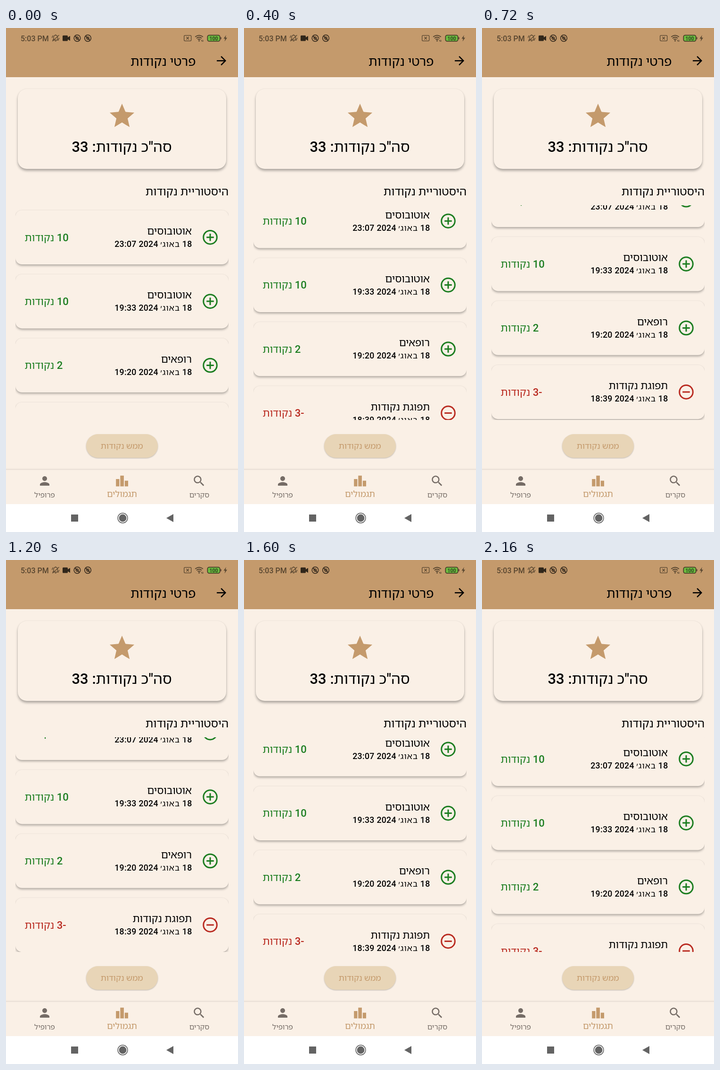
An HTML page that plays this animation: 492 by 1066 pixels, repeating every 2240 ms.

```html
<!DOCTYPE html>
<html lang="he">
<head>
<meta charset="utf-8">
<title>פרטי נקודות</title>
<style>
  html, body { margin: 0; width: 100%; height: 100%; overflow: hidden; background: #faf0e6; }
  svg { display: block; width: 492px; height: 1066px; }
  text { font-family: Roboto, "Noto Sans Hebrew", "Open Sans", "Noto Sans", "Liberation Sans", sans-serif; }
  .rtl { direction: rtl; }
  .mid { text-anchor: middle; }
  .left { text-anchor: end; }
  .strong { font-weight: 500; }
  .card { fill: #faf0e6; filter: drop-shadow(0 0 1px rgba(0,0,0,.09)) drop-shadow(0 3px 2px rgba(0,0,0,.27)); }
  .card.high { filter: drop-shadow(0 0 1.2px rgba(0,0,0,.1)) drop-shadow(0 4px 2.8px rgba(0,0,0,.29)); }
  .line { fill: none; stroke: currentColor; }
  .gain { color: #1b7d20; }
  .loss { color: #b92a20; }
  .pts { fill: currentColor; }
</style>
</head>
<body>
<svg viewBox="0 0 492 1066">
  <defs>
    <clipPath id="view"><rect x="20" y="375" width="452" height="454"/></clipPath>
  </defs>
  <rect width="492" height="1066" fill="#faf0e6"/>
  <rect width="492" height="104" fill="#c49a6c"/>

  <!-- status bar -->
  <g color="#57452f" fill="#57452f">
    <text x="31" y="27.5" font-size="16" font-weight="500">5:03 PM</text>
    <path class="line" stroke-width="1.4" d="M99.5 25.5h11.5l-1.6-2.4v-3.6a4.2 4.2 0 0 0-8.4 0v3.6zM105.2 15.2v-1.4M103.6 27.6h3.2M112.5 15l-14 13M97.8 21q0-3 2-5M112.6 21q0 2-1 3"/>
    <path fill="#30261a" d="M121.5 15.8h8q1.5 0 1.5 1.5v2.4l5-3v10.2l-5-3v2.1q0 1.5-1.5 1.5h-8q-1.5 0-1.5-1.5v-8.7q0-1.5 1.5-1.5z"/>
    <g id="rings" color="#3f3122"></g>
    <rect class="line" x="377.7" y="15.7" width="15" height="11.6" rx="2" stroke-width="1.3"/>
    <path class="line" stroke-width="1.3" d="M382.5 18.8l5.4 5.4m0-5.4l-5.4 5.4"/>
    <path class="line" stroke-width="1.9" d="M401.2 18.7q8.3-6.6 16.6 0M403.9 21.7q5.6-4.4 11.2 0M406.5 24.6q3-2.3 6 0"/>
    <circle cx="409.5" cy="27" r="1.5"/>
    <path class="line" stroke-width="1" d="M415.3 29v-4m-1.5 1.5l1.5-1.5m2.5 0v4m-1.3-1.4l1.3 1.4"/>
    <rect x="427.3" y="15.3" width="26.4" height="12.8" rx="3.5" fill="#6bb83f" stroke="#3f3322" stroke-width="1.5"/>
    <rect x="454.6" y="19.3" width="2" height="4.8" rx="1"/>
    <text class="mid" x="440.5" y="25.5" font-size="10.5" font-weight="500" fill="#26351a">100</text>
    <path d="M466.8 15l-5.3 7.6h3.3l-1.3 5.9 5.5-7.9h-3.4z"/>
  </g>

  <!-- app bar -->
  <text class="rtl" x="402.5" y="80" font-size="27.1">פרטי נקודות</text>
  <path transform="translate(442 54.3) scale(1.253)" d="M12 4l-1.41 1.41L16.17 11H4v2h12.17l-5.58 5.59L12 20l8-8z"/>

  <!-- total -->
  <rect class="card high" x="25" y="129" width="442" height="169" rx="19"/>
  <path fill="#c49a6c" transform="translate(214.7 154.8) scale(2.61)" d="M12 17.27L18.18 21l-1.64-7.03L22 9.24l-7.19-.61L12 2 9.19 8.63 2 9.24l5.46 4.73L5.82 21z"/>
  <text class="rtl mid strong" x="245.5" y="262" font-size="31">סה"כ נקודות: 33</text>
  <text class="rtl strong" x="472" y="354" font-size="24">היסטוריית נקודות</text>

  <g clip-path="url(#view)"><g id="list"></g></g>

  <!-- redeem button -->
  <rect x="170" y="859" width="152" height="50" rx="25" fill="#e8d5b7" style="filter:drop-shadow(0 1.2px 1px rgba(0,0,0,.25))"/>
  <text class="rtl mid" x="245.7" y="890" font-size="17.6" fill="#c49a6c">ממש נקודות</text>

  <!-- tabs -->
  <rect x="-6" y="934.5" width="504" height="80" fill="#faf0e6" style="filter:drop-shadow(0 -1px 1.5px rgba(0,0,0,.13))"/>
  <g fill="#756c66">
    <path transform="translate(67 943) scale(1.253)" d="M12 12c2.21 0 4-1.79 4-4s-1.79-4-4-4-4 1.79-4 4 1.79 4 4 4zm0 2c-2.67 0-8 1.34-8 4v2h16v-2c0-2.66-5.33-4-8-4z"/>
    <path transform="translate(394.5 943) scale(1.253)" d="M15.5 14h-.79l-.28-.27C15.41 12.59 16 11.11 16 9.5 16 5.91 13.09 3 9.5 3S3 5.91 3 9.5 5.91 16 9.5 16c1.61 0 3.09-.59 4.23-1.57l.27.28v.79l5 4.99L20.49 19l-4.99-5zm-6 0C7.01 14 5 11.99 5 9.5S7.01 5 9.5 5 14 7.01 14 9.5 11.99 14 9.5 14z"/>
    <text class="rtl mid" x="82" y="993" font-size="15.5">פרופיל</text>
    <text class="rtl mid" x="410" y="993" font-size="15.5">סקרים</text>
  </g>
  <g fill="#c49a6c">
    <path d="M233.2 954h7.2v15.5h-7.2zM242.3 946.7h7.6v22.8h-7.6zM251.8 957.5h7.2v12h-7.2z"/>
    <text class="rtl mid" x="246" y="992" font-size="18.4">תגמולים</text>
  </g>

  <!-- system keys -->
  <rect y="1007" width="492" height="59" fill="#fff"/>
  <g fill="#636363" color="#636363">
    <rect x="138" y="1029" width="15" height="15"/>
    <circle cx="247.5" cy="1036.5" r="7.9"/>
    <circle class="line" cx="247.5" cy="1036.5" r="10.4" stroke-width="1.5"/>
    <path d="M340 1036.5l15-8.5v17z"/>
  </g>
</svg>
<script>
const LOOP = 2240, STEP = 80, PITCH = 135.4;

const items = [
  ['אוטובוסים', '23:07', 10],
  ['אוטובוסים', '19:33', 10],
  ['רופאים', '19:20', 2],
  ['תפוגת נקודות', '18:39', -3],
];

// time in ms, scroll offset in px
const path = [
  [80, 0], [160, 4], [400, 34.5], [720, 79], [960, 91],
  [1200, 77], [1600, 42.5], [1920, 18], [2020, 16], [2160, 22],
];

const list = document.getElementById('list');

function itemMarkup([title, hour, points], i) {
  const minus = 'M425.2 442.7h15.6';
  const sign = points > 0 ? minus + 'M433 434.9v15.6' : minus;
  return `<g class="${points > 0 ? 'gain' : 'loss'}" transform="translate(0 ${i * PITCH})">
    <rect class="card" x="20" y="385.5" width="452" height="114.5" rx="14"/>
    <circle class="line" cx="433" cy="442.7" r="14.3" stroke-width="3"/>
    <path class="line" stroke-width="3" d="${sign}"/>
    <text class="rtl strong" x="394" y="437" font-size="22">${title}</text>
    <text class="rtl strong" x="394.5" y="463" font-size="17.7" letter-spacing=".3">18 <tspan font-weight="400" letter-spacing="1">באוג׳</tspan> 2024 ${hour}</text>
    <text class="rtl left strong pts" x="39.5" y="450.5" font-size="22.1">${points} נקודות</text>
  </g>`;
}

function slope(i) {
  const a = path[Math.max(i - 1, 0)], b = path[Math.min(i + 1, path.length - 1)];
  return (b[1] - a[1]) / (b[0] - a[0]);
}

// cubic Hermite curve through the path points
function scrollAt(t) {
  if (t <= path[0][0]) return 0;
  let i = 0;
  while (i < path.length - 2 && t > path[i + 1][0]) i++;
  const [t0, y0] = path[i], [t1, y1] = path[i + 1];
  const d = t1 - t0, u = (t - t0) / d, v = 1 - u;
  return v * v * (1 + 2 * u) * y0 + u * u * (3 - 2 * u) * y1
    + d * u * v * (v * slope(i) - u * slope(i + 1));
}

document.getElementById('rings').innerHTML = [151, 173.5].map(x =>
  `<g transform="translate(${x} 21.5)"><circle class="line" r="6.8" stroke-width="1.7"/>
   <path class="line" stroke-width="2.2" d="M-4.5-4.5L4.5 4.5"/>
   <circle class="line" r="2.8" stroke-width="1.4"/></g>`).join('');
list.innerHTML = items.map(itemMarkup).join('');

const start = performance.now();
function draw() {
  const t = (performance.now() - start) % LOOP;
  const held = Math.floor(t / STEP) * STEP;
  list.setAttribute('transform', `translate(0 ${-scrollAt(held).toFixed(2)})`);
  requestAnimationFrame(draw);
}
draw();
</script>
</body>
</html>
```
